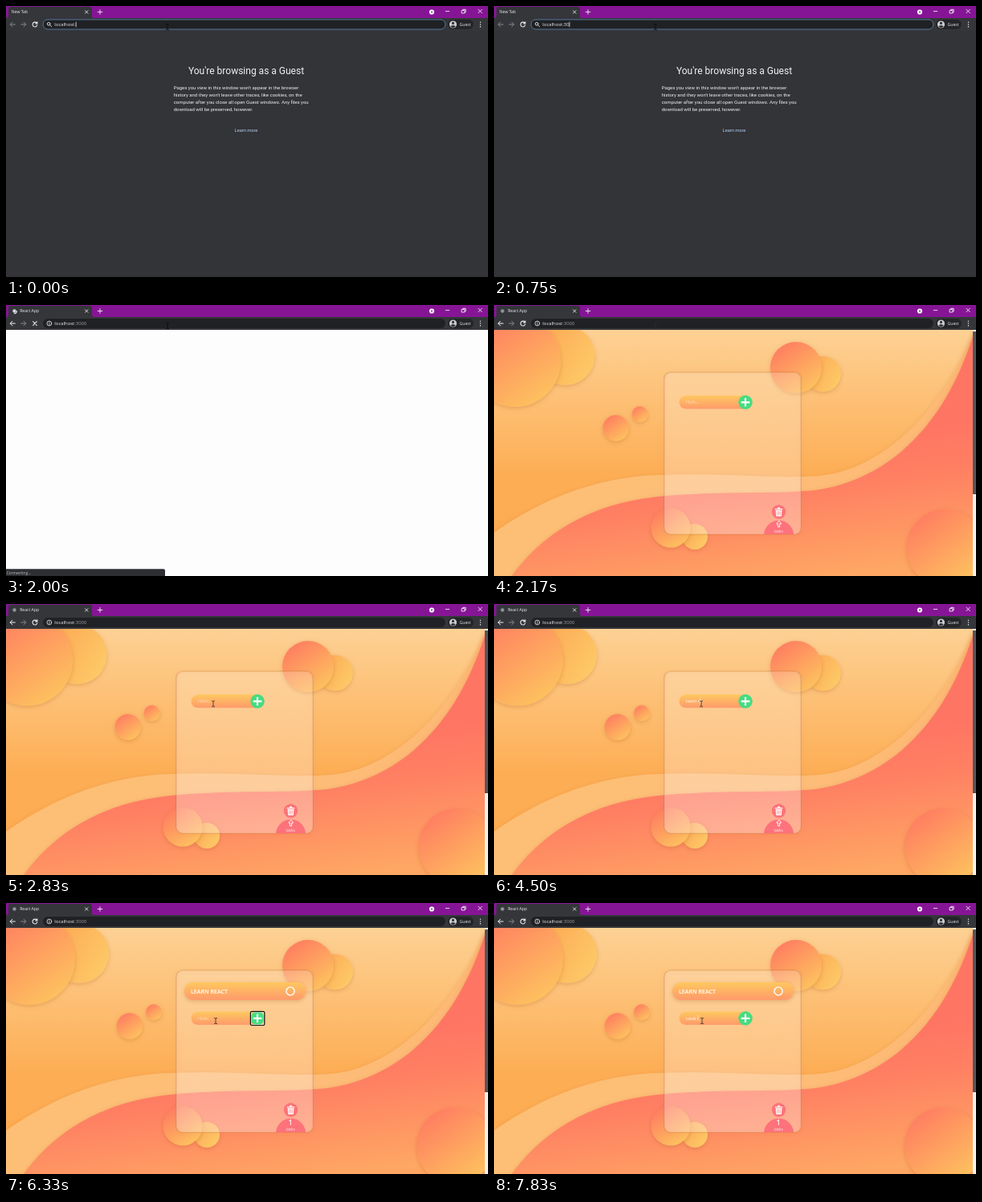
Recreate the animation shown at these times as an HTML page. Size 600x338 px, loop 8000 ms.

```html
<!DOCTYPE html>
<html lang="en">
<head>
<meta charset="utf-8">
<title>Todo demo</title>
<style>
  html, body { margin: 0; width: 100%; height: 100%; overflow: hidden; background: #35363a; }
  svg { display: block; width: 600px; height: 338px; }
  text { white-space: pre; }
  .ui { font-family: "Open Sans", "Noto Sans", sans-serif; fill: #eceef0; font-size: 5.1px; }
  .rb { font-family: Roboto, sans-serif; fill: #f0f1f2; }
  .field { font-family: Lato, sans-serif; font-size: 6px; fill: #fff; }
  .line { fill: none; stroke: #eceef0; stroke-linecap: round; stroke-linejoin: round; }
</style>
</head>
<body>
<svg viewBox="0 0 600 338">
  <defs>
    <linearGradient id="sky" x2="0" y2="1">
      <stop offset="0" stop-color="#fdd194"/><stop offset=".58" stop-color="#fdae55"/><stop offset="1" stop-color="#fdaa50"/>
    </linearGradient>
    <linearGradient id="band" x2="1" y2="0">
      <stop offset="0" stop-color="#fdbf74"/><stop offset=".6" stop-color="#fdbd78"/><stop offset="1" stop-color="#fdb873"/>
    </linearGradient>
    <linearGradient id="hill" gradientUnits="userSpaceOnUse" x1="330" y1="180" x2="352" y2="345">
      <stop offset="0" stop-color="#ff7563"/><stop offset=".35" stop-color="#ff8064"/><stop offset="1" stop-color="#fea663"/>
    </linearGradient>
    <linearGradient id="ball" x1=".15" y1=".1" x2=".75" y2=".95">
      <stop offset="0" stop-color="#ff7e62"/><stop offset="1" stop-color="#fdc15e"/>
    </linearGradient>
    <linearGradient id="gold" x1="0" y1=".2" x2="1" y2=".8">
      <stop offset="0" stop-color="#fda855"/><stop offset="1" stop-color="#fdcb68"/>
    </linearGradient>
    <linearGradient id="pill" x2="0" y2="1">
      <stop offset="0" stop-color="#fec85f"/><stop offset="1" stop-color="#fe9a6b"/>
    </linearGradient>
    <linearGradient id="glass" x2="0" y2="1">
      <stop offset="0" stop-color="#fff" stop-opacity=".2"/><stop offset="1" stop-color="#fff0f0" stop-opacity=".34"/>
    </linearGradient>
    <filter id="soft" x="-30%" y="-30%" width="160%" height="160%">
      <feDropShadow dx="0" dy="1.5" stdDeviation="2.5" flood-color="#a84a18" flood-opacity=".28"/>
    </filter>
    <clipPath id="view"><path d="M0 31H596V338H0Z"/></clipPath>
    <clipPath id="cardClip"><rect x="212" y="84" width="170" height="202" rx="8"/></clipPath>
  </defs>

  <path fill="#861596" d="M0 0H600V16H0Z"/>
  <path fill="#35363a" d="M0 15H600V31H0ZM0 16Q3 15 3 12V4Q3 1 6 1H104Q107 1 107 4V12Q107 15 110 15.5Z"/>
  <g id="tabIcon">
    <circle id="favicon" cx="10.5" cy="7.5" r="2.2"/>
    <path id="spinner" class="line" d="M7 7.5A3.3 3.3 0 0 1 10.3 4.2"/>
  </g>
  <text id="title" class="ui" y="9.4"></text>
  <path class="line" stroke-width=".9" d="M98.6 5.8L102 9.2M102 5.8L98.6 9.2M114.2 7.5H119.8M117 4.7V10.3M547.3 6.6H551.7M588 4.3L592.4 8.7M592.4 4.3L588 8.7M567.5 5.6H571V9H567.5ZM568.7 5.4V4.3H572.2V7.8H571.2"/>
  <circle cx="530" cy="7.5" r="3.1" fill="#fff"/><circle cx="530" cy="7.5" r="1" fill="#861596"/>

  <path id="back" class="line" d="M11.3 23H5.2M8 20.2L5.2 23L8 25.8"/>
  <path class="line" style="stroke:#85878b" d="M18.7 23H24.8M22 20.2L24.8 23L22 25.8"/>
  <path id="reload" class="line" stroke-width="1.1" d="M38.3 21.3A2.9 2.9 0 1 0 38.8 23.8M38.9 19.8V22H36.6"/>
  <path id="stop" class="line" stroke-width="1.1" d="M33.7 20.7L38.3 25.3M38.3 20.7L33.7 25.3"/>
  <rect id="bar" x="46" y="17" width="501" height="12" rx="6" fill="#202124"/>
  <path id="search" class="line" stroke-width=".9" d="M55 22.3A1.8 1.8 0 1 1 51.4 22.3A1.8 1.8 0 1 1 55 22.3M54.6 23.7L56.6 25.7"/>
  <path id="info" class="line" stroke-width=".8" d="M56.8 23A2.9 2.9 0 1 1 51 23A2.9 2.9 0 1 1 56.8 23M53.9 22.8V24.5M53.9 21.3V21.4"/>
  <text class="ui" x="60.3" y="25" style="font-size:5.95px">localhost<tspan id="port"></tspan></text>
  <path id="caret" stroke="#fff" stroke-width=".7" d="M0 19.8V26.2"/>
  <rect x="550" y="17" width="32" height="12" rx="6" fill="#242528"/>
  <circle cx="556.5" cy="23" r="4.6" fill="#c9cbce"/>
  <path fill="#303136" d="M556.5 19.8a1.6 1.6 0 1 1 0 3.2a1.6 1.6 0 1 1 0-3.2M553.3 25.6Q556.5 22.6 559.7 25.6Q556.5 28.6 553.3 25.6"/>
  <text class="ui" x="564.6" y="24.9">Guest</text>
  <path class="line" stroke-width="1.4" d="M590.5 20.2V20.3M590.5 23V23.1M590.5 25.8V25.9"/>

  <g id="guest">
    <path fill="#333438" d="M0 31H600V338H0Z"/>
    <text class="rb" x="299" y="85" font-size="12" text-anchor="middle">You're browsing as a Guest</text>
    <g id="notice" class="rb" font-size="6"></g>
    <text class="rb" x="299" y="157.3" font-size="5.7" text-anchor="middle" style="fill:#b4cdf6">Learn more</text>
  </g>
  <path id="blank" fill="#fefdfe" d="M0 31H600V338H0Z"/>

  <g id="app">
    <g clip-path="url(#view)">
      <path fill="url(#sky)" d="M0 31H596V338H0Z"/>
      <path filter="url(#soft)" fill="url(#band)" d="M0 284C55 245 125 214 205 212C285 209 350 217 405 213C490 205 565 120 597 31V338H0Z"/>
      <path filter="url(#soft)" fill="url(#hill)" d="M22 338C60 286 120 245 215 238C290 232 350 236 400 231C500 216 565 140 597 36V338Z"/>
      <g id="balls"></g>
    </g>
    <path fill="#f6f1ee" d="M596 31H600V338H596Z"/><path fill="#54555a" d="M596 33H600V236H596Z"/>
    <rect x="212" y="84" width="170" height="202" rx="8" fill="none" stroke="#b86a30" stroke-opacity=".3" stroke-width="1.6" filter="url(#soft)"/>
    <rect x="212" y="84" width="170" height="202" rx="8" fill="url(#glass)"/>
    <g clip-path="url(#cardClip)"><circle cx="354.5" cy="287.3" r="18.6" fill="#fd727b"/></g>
    <g id="item">
      <rect x="222" y="99" width="151" height="22" rx="11" fill="url(#pill)" filter="url(#soft)"/>
      <text class="ui" x="230" y="112.6" style="font-size:7.1px;font-weight:600;fill:#fff">LEARN REACT</text>
      <circle cx="354" cy="110" r="5.1" fill="none" stroke="#fff" stroke-width="1.4"/>
    </g>
    <g id="entry">
      <rect x="230.5" y="113" width="91" height="16.6" rx="8.3" fill="url(#pill)"/>
      <text id="hint" class="field" x="239" y="123" fill-opacity=".5" font-style="italic">Hello...</text>
      <text id="typed" class="field" x="239" y="123" fill-opacity=".88"></text>
      <path id="fieldCaret" stroke="#fff" stroke-width=".6" d="M0 117.5V124.5"/>
      <circle cx="313" cy="121.3" r="8.7" fill="#46dc81"/>
      <path stroke="#fff" stroke-width="2.2" d="M307.7 121.3H318.3M313 116V126.6"/>
      <g id="ring" fill="none">
        <rect x="305.2" y="113.6" width="15.8" height="15.6" rx="1" stroke="#fff" stroke-width=".7"/>
        <rect x="304.4" y="112.8" width="17.4" height="17.2" rx="1.4" stroke="#141414" stroke-width="1.2"/>
      </g>
    </g>
    <circle cx="354.5" cy="258" r="8.7" fill="#fb7478"/>
    <path fill="#fff" d="M349.8 254H359.2V255.3H349.8ZM353 252.6H356V254H353ZM350.6 256H358.4L357.8 263.4H351.2Z"/>
    <path stroke="#fb7478" stroke-width=".7" d="M352.6 257.2V262M354.5 257.2V262M356.4 257.2V262"/>
    <path id="none" class="line" stroke-width=".9" style="stroke:#fff" d="M354.5 269.6L351.7 273H353.4V276.8H355.6V273H357.3Z"/>
    <text id="count" class="ui" x="354" y="277" text-anchor="middle" style="font-size:8.5px;font-weight:600;fill:#fff">1</text>
    <text class="ui" x="354.2" y="284.3" text-anchor="middle" style="font-size:4.8px;fill:#fff" fill-opacity=".85">tasks</text>
  </g>

  <g id="status">
    <path id="statusBar" d="M0 329.3H196Q198 329.3 198 331.3V338H0Z"/>
    <text class="ui" x=".4" y="335.5" style="fill:#bfc2c6">Connecting...</text>
  </g>
  <path id="mouse" class="line" stroke-width=".8" d="M-1.6 -3.6Q0 -3.6 0 -2.8Q0 -3.6 1.6 -3.6M0 -2.8V2.8M-1.6 3.6Q0 3.6 0 2.8Q0 3.6 1.6 3.6"/>
</svg>
<script>
const LOOP = 8000, start = performance.now();
const $ = id => document.getElementById(id);
const show = (id, on) => $(id).style.display = on ? '' : 'none';
const set = (id, attrs) => { for (const k in attrs) $(id).setAttribute(k, attrs[k]); };
const clamp = v => Math.min(1, Math.max(0, v));
const ease = v => v * v * (3 - 2 * v);
const span = (t, a, b) => ease(clamp((t - a) / (b - a)));

$('notice').innerHTML = [
  "Pages you view in this window won't appear in the browser",
  "history and they won't leave other traces, like cookies, on the",
  "computer after you close all open Guest windows. Any files you",
  "download will be preserved, however."
].map((s, i) => `<text x="208.7" y="${104 + i * 8.85}">${s}</text>`).join('');

// x, y, radius, fill, drift
const balls = [
  [91, 63, 37, 'gold', 2.6], [29, 70, 57, 'ball', 2.8],
  [409.5, 86, 22.3, 'gold', 0], [376, 78, 32, 'ball', 0],
  [154, 153.5, 16.2, 'ball', 2.3], [184, 136.2, 10, 'ball', 2.4],
  [250, 289, 16, 'gold', 0], [220, 278, 24.5, 'ball', 0],
  [559, 303, 48, 'ball', -2.3]
];
$('balls').innerHTML = balls.map(([x, y, r, f]) =>
  `<circle cx="${x}" cy="${y}" r="${r}" fill="url(#${f})" filter="url(#soft)"/>`).join('');
const dots = [...$('balls').children];

const portKeys = [330, 580, 830, 920];
const learnKeys = [3200, 3330, 3500, 3670, 4000, 4170, 4500, 4750, 5000, 5080, 5250];
const cookKeys = [7000, 7170, 7330, 7670, 7830];
const typed = (s, keys, t) => s.slice(0, keys.filter(k => t >= k).length);

// time, x, y
const path = [[0, 201, 26], [2330, 201, 26], [2331, 258, 124.5], [4700, 258, 124.5],
  [5250, 313, 124], [5750, 313, 124], [6250, 261, 147], [6500, 261, 147], [6750, 259, 147], [LOOP, 259, 147]];
function mouseAt(t) {
  const i = path.findIndex(p => p[0] > t), a = path[i - 1], b = path[i];
  const k = span(t, a[0], b[0]);
  return [a[1] + (b[1] - a[1]) * k, a[2] + (b[2] - a[2]) * k];
}

function draw(t) {
  const nav = t >= 1170, page = t >= 1750, app = t >= 2170, added = t >= 5420;
  const loading = nav && !app;

  $('title').textContent = page ? 'React App' : 'New Tab';
  set('title', { x: nav ? 17.2 : 6.8 });
  show('tabIcon', nav);
  show('favicon', page);
  set('favicon', { fill: app ? '#8f9499' : '#d5d7da' });
  show('spinner', loading);
  set('spinner', { transform: `rotate(${(t - 1500) * .36} 10.3 7.5)` });
  show('reload', !loading);
  show('stop', loading);
  $('back').style.stroke = page ? '#f2f3f4' : '#85878b';

  set('bar', { stroke: nav ? 'none' : '#5f88b4', 'stroke-width': .8 });
  show('search', !nav);
  show('info', nav);
  $('port').textContent = ':' + typed('3000', portKeys, t);
  $('port').style.fill = nav ? '#9aa0a6' : '#eceef0';
  show('caret', !nav);
  if (!nav) set('caret', { transform: `translate(${$('port').parentNode.getComputedTextLength() + 60.7} 0)` });

  show('guest', !page);
  show('blank', page && !app);
  show('app', app);
  show('status', loading);
  set('statusBar', { fill: page ? '#2d2e32' : '#333438' });

  const drift = 1 - span(t, 2830, 3580);
  dots.forEach((d, i) => d.setAttribute('cx', balls[i][0] - balls[i][4] * drift));

  const text = added ? typed('cook ', cookKeys, t) : typed('learn react', learnKeys, t);
  $('typed').textContent = text;
  show('hint', !text);
  show('fieldCaret', text);
  if (app && text) set('fieldCaret', { transform: `translate(${239.6 + $('typed').getComputedTextLength()} 0)` });
  show('item', added);
  set('item', { opacity: span(t, 5380, 5900) });
  set('entry', { transform: `translate(0 ${added ? 22.5 : 0})` });
  show('ring', added && t < 6670);
  show('none', !added);
  show('count', added);

  const [x, y] = mouseAt(t);
  set('mouse', { transform: `translate(${x} ${y})` });
  $('mouse').style.stroke = app ? '#3a2a20' : '#0c0c0e';
}

(function tick() {
  draw((performance.now() - start) % LOOP);
  requestAnimationFrame(tick);
})();
</script>
</body>
</html>
```
